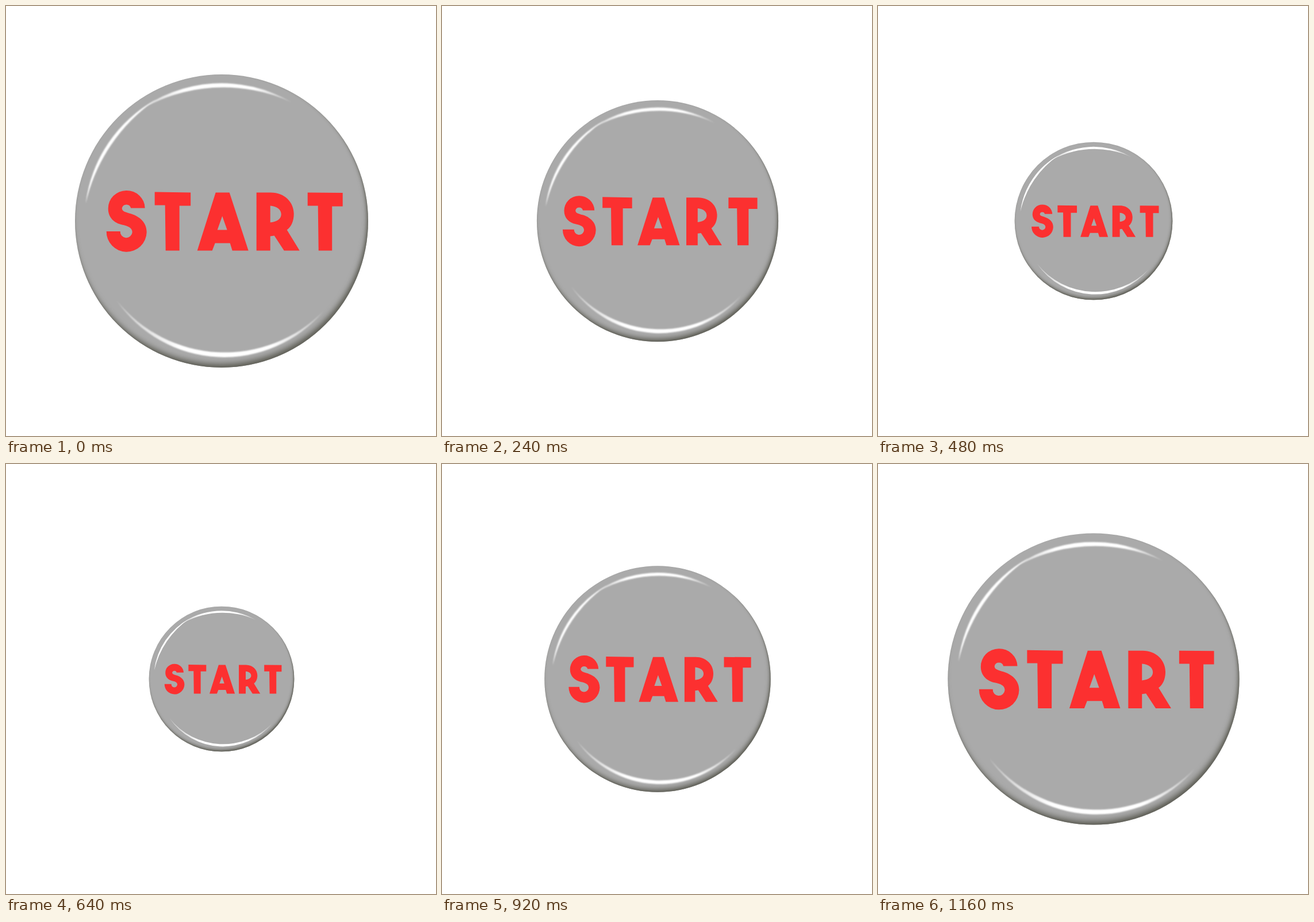
An HTML page that plays this animation: 748x748 px, repeating every 1200 ms.

```html
<!DOCTYPE html>
<html lang="en">
<head>
<meta charset="utf-8">
<title>Start button</title>
<style>
  @property --phase {
    syntax: "<angle>";
    inherits: false;
    initial-value: 0deg;
  }
  html, body {
    margin: 0;
    width: 100%;
    height: 100%;
    overflow: hidden;
    background: #fff;
  }
  /* Cosine pulse between 1 and 0.49, held for 40 ms per step */
  .button {
    position: absolute;
    left: 120.3px;
    top: 118.6px;
    width: 510px;
    height: 510px;
    border-radius: 50%;
    background: #aaa;
    transform: scale(calc(0.745 + 0.255 * cos(var(--phase))));
    animation: pulse 1.2s steps(30) infinite;
  }
  .button::before {
    content: "";
    position: absolute;
    inset: 0;
    border-radius: 50%;
    box-shadow:
      inset -3px -9px 9px -1px rgba(84, 84, 74, .62),
      inset -2px -3px 4px rgba(84, 84, 74, .5);
  }
  @keyframes pulse {
    to { --phase: 360deg; }
  }
  svg {
    position: absolute;
    inset: 0;
    width: 100%;
    height: 100%;
  }
</style>
</head>
<body>
<div class="button">
  <svg viewBox="120.3 118.6 510 510" role="img" aria-label="START">
    <defs>
      <filter id="soft" x="-10%" y="-20%" width="120%" height="140%">
        <feGaussianBlur stdDeviation="1.3"/>
      </filter>
      <linearGradient id="fade">
        <stop offset="0" stop-color="#fff" stop-opacity=".35"/>
        <stop offset=".3" stop-color="#fff"/>
        <stop offset=".75" stop-color="#fff"/>
        <stop offset="1" stop-color="#fff" stop-opacity=".3"/>
      </linearGradient>
    </defs>
    <g fill="url(#fade)" filter="url(#soft)">
      <path d="M228 184A241 241 0 0 1 497 167A284 284 0 0 0 228 184Z"/>
      <path fill="#fff" d="M139 343A239 239 0 0 1 262 162A300 300 0 0 0 139 343Z"/>
      <path d="M193 512A226.5 226.5 0 0 0 553 530A241 241 0 0 1 193 512Z"/>
    </g>
    <g fill="#fc3030" fill-rule="evenodd">
      <path d="M242 351A32 31 0 0 0 178 352C178 368 189 377 202 380C212 382 220 385 220 393A10.5 10.5 0 0 1 199 391.5H175A35 35 0 0 0 245 393C245 376 233 366 218 361C208 358 202 357 202 351A8 8 0 0 1 217.5 351Z"/>
      <path d="M259 323L321.5 324V347H302V425H278L277 346H259Z"/>
      <path d="M365 324H389L422 425H394L390 412H364L359 425H333ZM376.5 365L368 389H385Z"/>
      <path d="M436 324H461C485 324 501 341 501 361C501 373 497 383 489 389L511 425H484L467 399L460 400V425H436ZM460 347V376C471 375 479 370 479 362C479 353 471 348 460 347Z"/>
      <path d="M525 324L586 324.5V348H567.5V425H544L543 347H525Z"/>
    </g>
  </svg>
</div>
</body>
</html>
```
